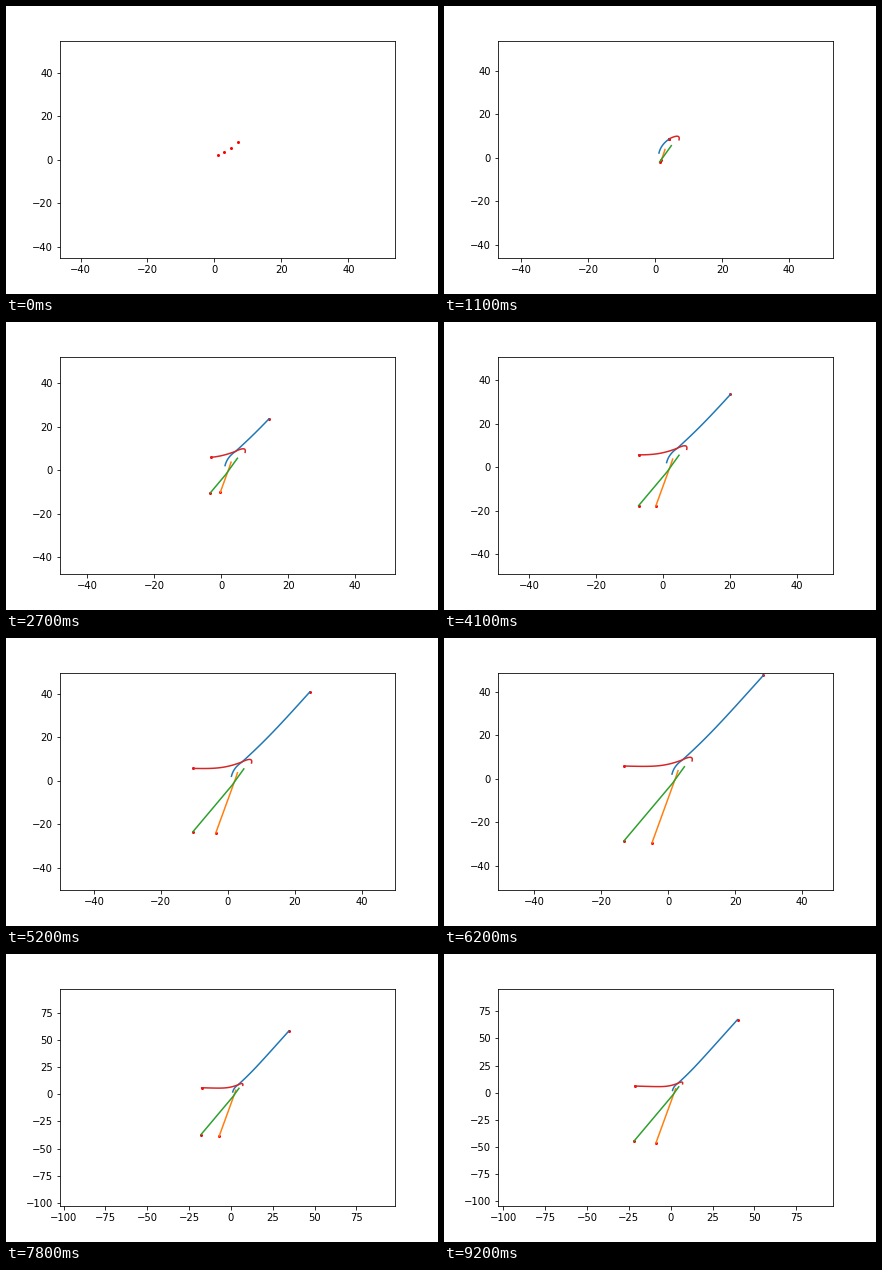
Animation, 432 px wide and 288 px high, one loop 9.3 s. Source, as a matplotlib script:

```python
import numpy as np
import matplotlib.pyplot as plt
from matplotlib.animation import FuncAnimation

FRAMES = 93
MEET = 11      # closest approach of the bodies
DECAY = 8.8    # how fast the kick from the encounter fades
ZOOM_OUT = 64  # the view doubles once a body reaches the border


def trajectory(start, bend, meet, kick, speed):
    """Curve from start to meet, then coast with a fading kick."""
    start, bend, meet, kick, speed = (
        np.array(p)[:, None] for p in (start, bend, meet, kick, speed))
    n = np.arange(FRAMES)
    s = np.minimum(n / MEET, 1)
    t = np.maximum(n - MEET, 0)
    approach = (1 - s) ** 2 * start + 2 * s * (1 - s) * bend + s ** 2 * meet
    return approach + speed * t + kick * (1 - np.exp(-t / DECAY))


paths = [
    trajectory((1.1, 2.1), (1.7, 6.0), (4.2, 8.6), (4.6, 5.3), (0.384, 0.659)),
    trajectory((2.9, 3.7), (2.4, 1.3), (1.8, -1.2), (0, 0), (-0.131, -0.555)),
    trajectory((4.8, 5.5), (3.1, 1.9), (1.3, -2.0), (0, 0), (-0.286, -0.523)),
    trajectory((7.1, 8.2), (7.6, 11.3), (4.1, 8.6), (-3.2, -3.4), (-0.2745, 0.012)),
]

fig, ax = plt.subplots(figsize=(6, 4), dpi=72)
fig.subplots_adjust(bottom=0.125)
trails = [ax.plot([], [])[0] for _ in paths]
heads, = ax.plot([], [], "ro", markersize=2, zorder=1)


def update(n):
    half = 50 if n < ZOOM_OUT else 100
    cx, cy = 3.87 - 0.0765 * n, 4.92 - 0.0985 * n
    ax.set_xlim(cx - half, cx + half)
    ax.set_ylim(cy - half, cy + half)
    for path, trail in zip(paths, trails):
        trail.set_data(path[:, :n + 1])
    heads.set_data(np.transpose([path[:, n] for path in paths]))
    return [*trails, heads]


anim = FuncAnimation(fig, update, frames=FRAMES, interval=100, repeat=True)
plt.show()
```
